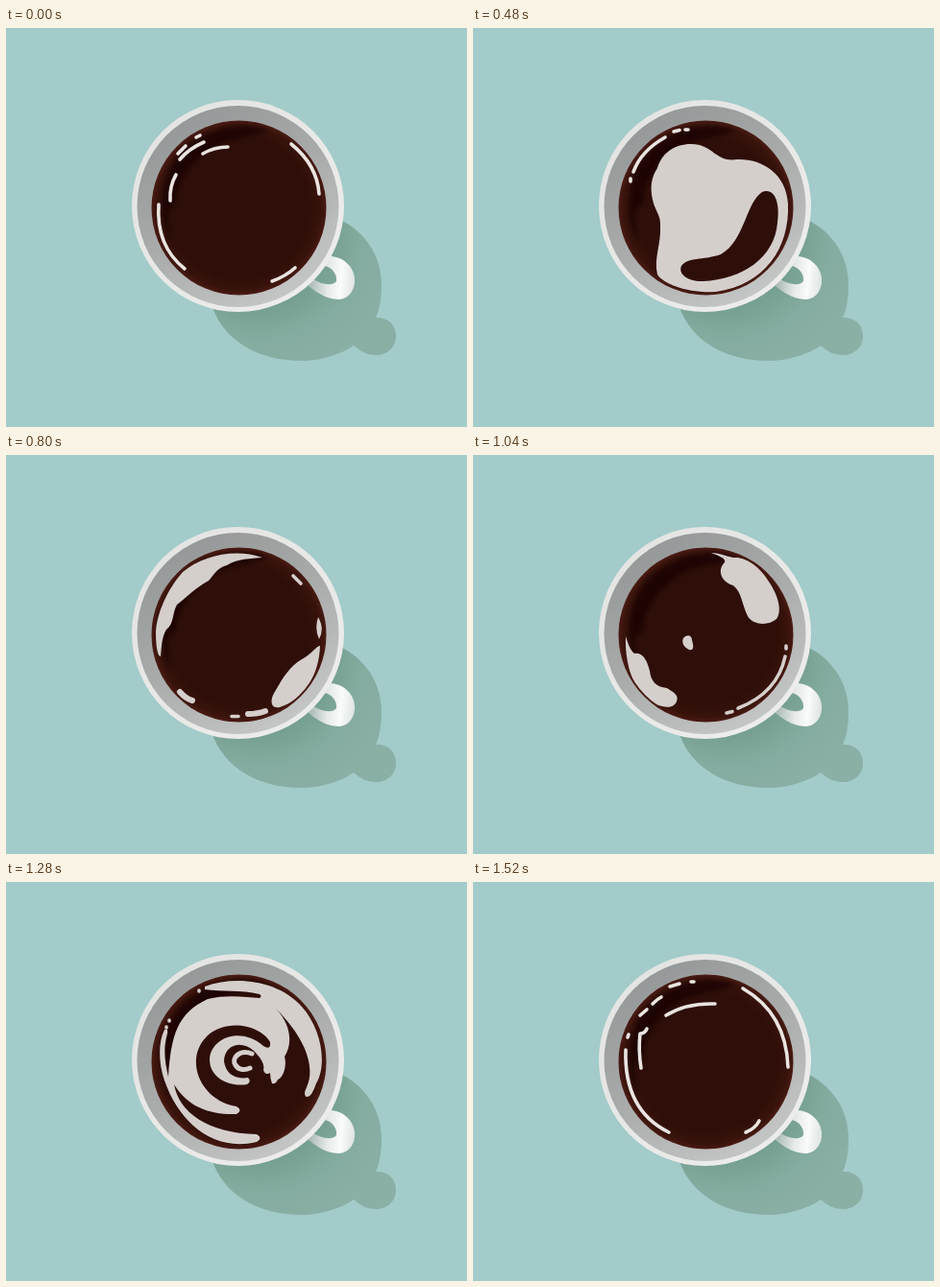
An HTML page that plays this animation: 480x416 px, repeating every 1.6 s.

```html
<!DOCTYPE html>
<html lang="en">
<head>
<meta charset="utf-8">
<title>Swirling coffee</title>
<style>
  html, body { margin: 0; height: 100%; overflow: hidden; background: #a2cbc9; }
  svg { display: block; width: 100vw; height: 100vh; }
  .pose { fill: #d5cfcc; stroke: #d5cfcc; stroke-width: 0; }
  .thin { fill: #e9e4e0; stroke: #e9e4e0; }
  .line { fill: none; stroke-width: 3.6; stroke-linecap: round; stroke-linejoin: round; }
  .wide { stroke-width: 6; }
</style>
</head>
<body>
<svg viewBox="0 0 480 416">
  <defs>
    <radialGradient id="shade" gradientUnits="userSpaceOnUse" cx="262" cy="215" r="150">
      <stop offset=".5" stop-color="#759f91"/><stop offset=".74" stop-color="#85aca0"/><stop offset="1" stop-color="#8aafa5"/>
    </radialGradient>
    <linearGradient id="wall" x1=".1" y1=".1" x2=".65" y2="1">
      <stop offset="0" stop-color="#949797"/><stop offset=".5" stop-color="#a9abab"/><stop offset="1" stop-color="#c4c5c5"/>
    </linearGradient>
    <linearGradient id="rim" x1="0" y1="0" x2="1" y2="1">
      <stop offset="0" stop-color="#e2e3e1"/><stop offset="1" stop-color="#eeeeec"/>
    </linearGradient>
    <linearGradient id="handle" gradientUnits="userSpaceOnUse" x1="318" y1="262" x2="362" y2="266">
      <stop offset="0" stop-color="#aebdba"/><stop offset=".4" stop-color="#e6eae9"/><stop offset=".7" stop-color="#fafbfb"/><stop offset="1" stop-color="#dfe5e4"/>
    </linearGradient>
    <radialGradient id="coffee">
      <stop offset=".8" stop-color="#2e0e08"/><stop offset=".94" stop-color="#38130c"/><stop offset="1" stop-color="#491b12"/>
    </radialGradient>
    <clipPath id="surface"><circle cx="242.5" cy="187.5" r="89"/></clipPath>
    <filter id="soft"><feGaussianBlur stdDeviation="2"/></filter>
    <filter id="liquid" filterUnits="userSpaceOnUse" x="0" y="0" width="480" height="416" color-interpolation-filters="sRGB">
      <feGaussianBlur stdDeviation="1.3"/>
      <feComponentTransfer><feFuncA type="linear" slope="9" intercept="-2.9"/></feComponentTransfer>
    </filter>
  </defs>

  <path fill="url(#shade)" d="M214 288C226 328 266 347 307 347C330 347 351 339 362 331C370 338 377 341 385 341C397 341 406 333 406 321C406 309 397 301 385 302C389 293 391 282 391 267C391 237 373 211 346 199Z"/>
  <path fill="url(#handle)" fill-rule="evenodd" d="M314 268C326 279 338 283 347 283C358 282 364 272 363 261C362 249 352 239 338 238L316 250ZM320 262L332 248C340 250 345 257 344 264C340 269 330 268 320 262Z"/>
  <circle cx="241.5" cy="185.5" r="110.5" fill="url(#rim)"/>
  <circle cx="241.5" cy="186" r="105" fill="url(#wall)"/>
  <circle cx="242.5" cy="187.5" r="91" fill="url(#coffee)"/>
  <path d="M274 107C238 95 192 108 171 146C160 170 160 200 171 224C170 205 166 195 170 188C179 186 176 174 181 162C190 144 205 130 222 121C238 113 255 114 274 107Z" fill="#160302" opacity=".7" filter="url(#soft)"/>

  <g clip-path="url(#surface)"><g id="milk">
    <g class="pose thin">
      <path class="line" d="M297 121Q324 143 326 173M205 131Q217 124 231 124M181 137Q190 126 206 119M179 131L187 123M198 114L202 112M177 153Q170 165 171 180M159 184Q156 227 186 251M277 264Q291 259 301 250"/>
    </g>
    <g class="pose">
      <path d="M174 237C184 252 205 266 222 269C245 273 272 268 292 254C310 240 319 226 320 212C313 230 300 242 285 252C265 263 245 266 224 266.5C222 265.5 223 264 226 263.5C262 260 298 242 314 217C327 196 330 172 321 158C319 186 314 205 300 223C282 244 258 255 234 257C210 259 188 252 174 237Z"/>
      <path class="line" d="M169 232v1" style="stroke-width:2.5"/>
    </g>
    <g class="pose">
      <path fill-rule="evenodd" d="M187 179C184 165 186 155 192 146C198 126 217 118 236 122C252 127 256 140 275 137C300 136 326 151 328 183C330 230 303 268 253 275C225 277 198 267 192 257C188 240 196 225 195 207C196 195 189 190 187 179ZM301 171C314 166 320 182 317 203C314 240 280 262 240 264C225 265 213 257 217 248C225 238 238 243 258 236C283 222 284 182 301 171Z"/>
      <path class="line thin" style="fill:none" d="M167 150Q175 128 200 114M209 108l6-1.5M221 106h3M164 157v3"/>
    </g>
    <g class="pose">
      <path d="M267 107C240 97 205 104 184 122C168 140 157 165 156 185C156 200 158 210 161 210C162 200 162 190 167 182C175 176 173 165 178 156C190 147 195 140 211 131C216 126 219 118 230 115C240 108 255 108 267 107ZM327 199C326 230 310 255 285 263C275 265 274 255 281 245C289 231 296 220 308 213C318 208 324 198 327 199ZM325 169Q332 181 326 192Q321 181 325 169Z"/>
      <path class="line" d="M299 126l8 8M235 272.5h7"/>
      <path class="line wide" d="M181 247Q187 254 194 256M252 270Q262 270 270 267"/>
    </g>
    <g class="pose">
      <path d="M248 102C258 102 268 108 276 107C292 110 302 122 310 135C318 148 322 163 316 171C308 178 292 178 286 168C280 156 280 143 271 136C258 132 254 120 262 112C264 108 256 105 248 102ZM159 189C158 215 165 240 180 253C192 263 208 267 212 257C215 250 208 247 202 243C190 242 185 235 184 225C180 210 175 206 168 207C163 203 161 195 159 189ZM219 191C222 187 228 187 228 193C230 200 230 204 225 203C219 200 217 195 219 191Z"/>
      <path class="line" d="M276 264Q317 248 325 210M326 199v3M264 269l6-1.5"/>
    </g>
    <g class="pose">
      <path d="M207 109C240 97 284 103 308 130C328 152 335 190 323 210Q318 225 313 224Q309 222 313 214C322 195 314 165 281 132C298 150 298 170 290 182C293 192 288 205 283 206Q281 211 277 210Q275 205 275 199Q270 202 268 196C270 190 264 182 258 176C245 164 227 170 227 187C229 200 238 206 252 204Q256 208 251 211C232 214 212 204 212 185C213 163 244 150 268 171Q276 176 275 167C266 150 230 141 209 161C185 185 202 228 240 234Q247 238 240 242C215 243 190 236 175 211C180 240 210 262 261 263Q268 267 261 271C215 282 180 250 165 207C159 190 158 168 165 154Q169 152 168 158C163 175 166 190 169 203C172 160 178 137 210 122C230 117 250 120 264 121Q267 119 264 117C245 112 225 115 207 112Z"/>
      <path class="line" style="stroke-width:5" d="M256 179C243 174 234 184 239 191C243 197 250 196 254 194"/>
      <path class="line" d="M170 144v1M167 151v1M201 113v1"/>
    </g>
    <g class="pose thin">
      <path class="line" d="M281 111Q326 137 328 193M201 139Q222 126 252 127M181 153Q179 158 174 158Q172 175 175 194M159 175Q157 238 204 261M284 261Q294 257 298 249M161 162l1-3M174 139l7-6M187 127q5-5 9-7M205 109l10-3M227 104h3"/>
    </g>
  </g></g>
</svg>
<script>
const STEP = 80, STEPS = 20;
const starts = [0, 4, 6, 10, 13, 16, 19, STEPS];
const turns = [0, 0, 25, 80, 50, 20, 0];   // degrees swirled on the way to the next pose
const milk = document.getElementById('milk');
const poses = [...milk.children];

function show(pose, weight, angle) {
  pose.style.display = '';
  pose.setAttribute('opacity', weight);
  pose.setAttribute('transform', `rotate(${angle} 242.5 187.5)`);
}

function draw(now) {
  const step = Math.floor(now / STEP) % STEPS;
  const i = starts.findIndex((s, n) => step >= s && step < starts[n + 1]);
  const k = (step - starts[i]) / (starts[i + 1] - starts[i]);
  poses.forEach(p => p.style.display = 'none');
  show(poses[i], 1 - k, turns[i] * k);
  if (k) {
    show(poses[(i + 1) % poses.length], k, turns[i] * (k - 1));
    milk.setAttribute('filter', 'url(#liquid)');
  } else {
    milk.removeAttribute('filter');
  }
  requestAnimationFrame(draw);
}
draw(performance.now());
</script>
</body>
</html>
```
